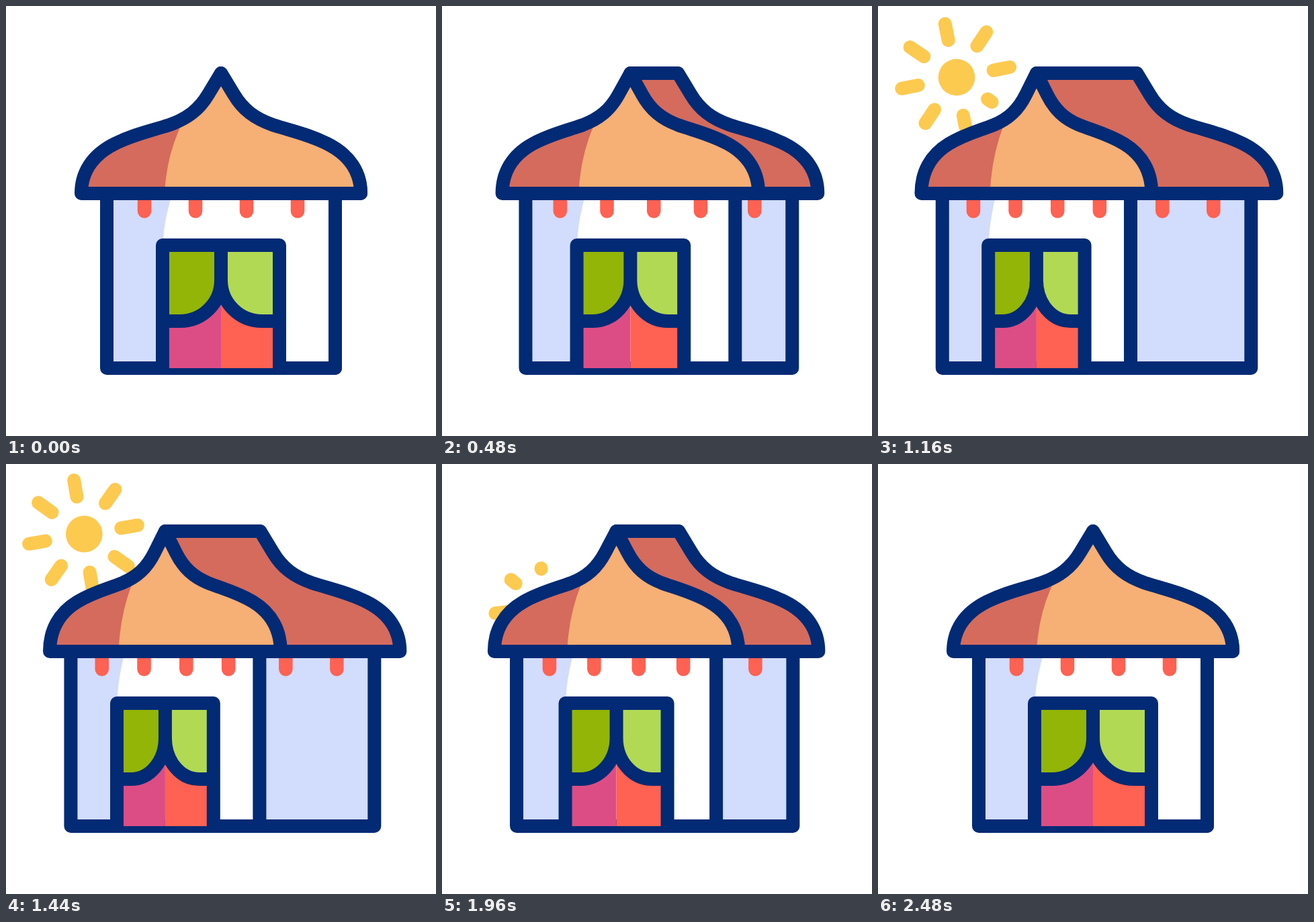
An HTML page for the animation above (3000 ms loop, 640 px wide and 640 px high).

```html
<!DOCTYPE html>
<html lang="en">
<head>
<meta charset="utf-8">
<title>Tent and sun</title>
<style>
  html, body { margin: 0; width: 100%; height: 100%; overflow: hidden; background: #fff; }
  svg { display: block; width: 100vw; height: 100vh; }
  .line { fill: none; stroke: #032a74; stroke-width: 20; stroke-linejoin: round; stroke-linecap: round; }
  .peg { fill: none; stroke: #ff6152; stroke-width: 20.5; stroke-linecap: round; }
  .ray { stroke: #fdca50; stroke-width: 20; stroke-linecap: round; }
</style>
</head>
<body>
<svg id="stage" viewBox="0 0 640 640">
  <defs><clipPath id="sky"><rect width="640" height="275"/></clipPath></defs>
  <g id="sun" clip-path="url(#sky)"></g>
  <g id="house"></g>
</svg>
<script>
const LOOP = 3000, STEP = 40, MID = 320;

// Keys are [time, value, slope].
const SLIDE = [[0, 0, 0], [1000, 84.3, 0], [1160, 84.1, -0.002], [1680, 77.5, -0.04],
  [2160, 34.7, -0.17], [2240, 19.5, -0.17], [2480, 0, 0]];
const DEPTH = [[0, 0, 0], [1000, 66.5, 0], [1160, 65.3, -0.016], [1680, 48.3, -0.05],
  [2160, 17.4, -0.085], [2240, 9.8, -0.09], [2480, 0, 0]];
const PEGS = [-114, -38, 38, 114];

function track(keys, t) {
  const n = keys.findIndex(k => k[0] > t);
  if (n < 0) return keys[keys.length - 1][1];
  const [t0, a, ma] = keys[n - 1], [t1, b, mb] = keys[n];
  const h = t1 - t0, u = (t - t0) / h, w = 1 - u;
  return a * w * w * (1 + 2 * u) + b * u * u * (3 - 2 * u) + h * u * w * (ma * w - mb * u);
}

function ease(t, start, span) {
  const u = Math.min(1, Math.max(0, (t - start) / span));
  return u * u * (3 - 2 * u);
}

function add(parent, tag, attrs) {
  const el = document.createElementNS('http://www.w3.org/2000/svg', tag);
  for (const k in attrs) el.setAttribute(k, attrs[k]);
  return parent.appendChild(el);
}

function set(el, attrs) {
  for (const k in attrs) el.setAttribute(k, attrs[k]);
}

const sun = document.getElementById('sun');
const house = document.getElementById('house');
const disc = add(sun, 'circle', { r: 27.3, fill: '#fdca50' });
const rays = Array.from({ length: 8 }, () => add(sun, 'line', { class: 'ray' }));

const fill = color => add(house, 'path', { fill: color });
const styled = name => add(house, 'path', { class: name });

const backWall = fill('#d2dcfd');
const backPegs = styled('peg');
const backWallLine = styled('line');
const backRoof = fill('#d46b5d');
const backRoofLine = styled('line');
const wall = fill('#fff');
const wallShade = fill('#d2dcfd');
const pegs = styled('peg');
const wallLine = styled('line');
const roof = fill('#f6af74');
const roofShade = fill('#d46b5d');
const roofLine = styled('line');
const curtainL = fill('#92b508');
const curtainR = fill('#b1d953');
const doorL = fill('#dc4d85');
const doorR = fill('#ff6152');
const doorLine = styled('line');

const draw = (el, d) => el.setAttribute('d', d);

// One roof slope from the apex down to the eave.
function slope(x, side) {
  const p = (dx, y) => x(side * dx) + ' ' + y;
  return `L${p(19, 131.5)} C${p(33, 155)} ${p(51, 168)} ${p(77, 177)}` +
    ` C${p(105, 186)} ${p(130, 191)} ${p(158, 205)} C${p(192, 222)} ${p(208, 248)} ${p(208, 279)}`;
}

const pegPath = (x, list) => list.map(v => `M${x(v)} 284V305.5`).join('');

function drawBack(front, e) {
  const x = v => MID + e + v;
  const left = front(100);
  draw(backWall, `M${left} 279H${x(170)}V539H${left}Z`);
  draw(backWallLine, `M${x(170)} 279V539H${left}`);
  draw(backPegs, pegPath(x, PEGS.slice(1)));
  const shape = `M${front(0)} 100 L${x(0)} 100 ${slope(x, 1)} H${front(0)}`;
  draw(backRoof, shape + 'Z');
  draw(backRoofLine, shape);
}

function drawFront(x, s) {
  const box = `M${x(-170)} 279V539H${x(170)}V279Z`;
  draw(wall, box);
  draw(wallLine, box);
  draw(wallShade, `M${x(-170)} 279H${x(-72.5)}Q${x(-84)} 316 ${x(-86)} 346V539H${x(-170)}Z`);
  draw(pegs, pegPath(x, PEGS));

  const left = `M${x(0)} 100 ${slope(x, -1)}`;
  const top = `${left} H${x(208)} M${x(0)} 100 ${slope(x, 1)}`;
  draw(roof, `M${x(0)} 100 ${slope(x, 1)} H${x(0)}Z ${left} H${x(0)}Z`);
  draw(roofShade, `M${x(-62)} 172 L${x(-60)} 179 Q${x(-80)} 222 ${x(-83.5)} 272 V279 H${x(-208)}` +
    ` C${x(-208)} 248 ${x(-192)} 222 ${x(-158)} 205 C${x(-130)} 191 ${x(-105)} 186 ${x(-77)} 177Z`);
  draw(roofLine, top);

  const drape = side => `M${x(side * 87)} 469 H${x(side * 61)}` +
    ` A${61 * s} 61 0 0 ${side < 0 ? 0 : 1} ${x(0)} 408 V356`;
  draw(doorL, `M${x(-87)} 356H${x(0)}V539H${x(-87)}Z`);
  draw(doorR, `M${x(87)} 356H${x(0)}V539H${x(87)}Z`);
  draw(curtainL, `${drape(-1)} H${x(-87)}Z`);
  draw(curtainR, `${drape(1)} H${x(87)}Z`);
  draw(doorLine, `M${x(-87)} 539V356H${x(87)}V539 ${drape(-1)} ${drape(1)}`);

  // Curtains sit under the frame, above the door panels.
  house.append(doorL, doorR, curtainL, curtainR, doorLine);
}

function drawSun(t) {
  const low = 1 - ease(t, 480, 720) + ease(t, 1600, 720);
  const cx = 115 + 79 * low, cy = 105 + 216 * low;
  const turn = -11.2 + 0.0054 * (t - 1160);
  set(disc, { cx: cx + 1.3, cy: cy - 0.8 });
  rays.forEach((ray, i) => {
    const len = 25 * (ease(t, 489 + 80 * i, 300) - ease(t, 1542 + 80 * i, 300));
    const a = (turn - 45 * i) * Math.PI / 180, c = Math.cos(a), s = Math.sin(a);
    set(ray, {
      x1: cx + 57 * c, y1: cy + 57 * s,
      x2: cx + (57 + len) * c, y2: cy + (57 + len) * s,
      visibility: len > 0.05 ? 'visible' : 'hidden'
    });
  });
}

function render(t) {
  const d = track(SLIDE, t);
  const s = 1 - d * 0.00209;
  const x = v => MID - d + v * s;
  drawSun(t);
  drawBack(x, track(DEPTH, t));
  drawFront(x, s);
}

const begin = performance.now();
function tick() {
  const t = (performance.now() - begin) % LOOP;
  render(Math.floor(t / STEP) * STEP);
  requestAnimationFrame(tick);
}
tick();
</script>
</body>
</html>
```
